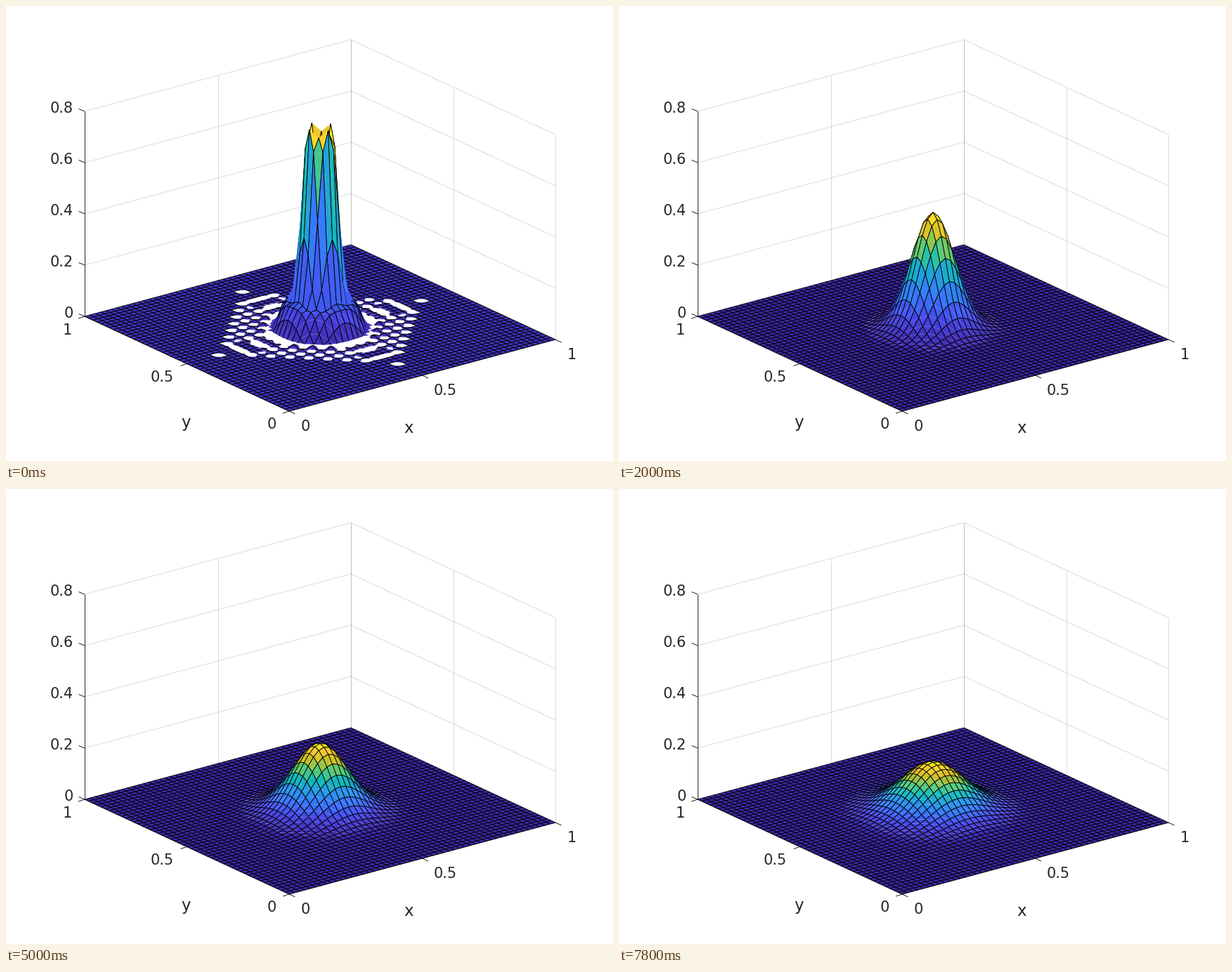
Animation of 864x648 px, one loop 8000 ms. Source, as a matplotlib script:

```python
import numpy as np
import matplotlib.pyplot as plt
from matplotlib.animation import FuncAnimation
from matplotlib.collections import LineCollection, PolyCollection
from matplotlib.colors import LinearSegmentedColormap

W, H = 864, 648
FRAMES, INTERVAL = 40, 200
N = 50
INK = "#262626"
CLEAR, BLACK = (0, 0, 0, 0), (0, 0, 0, 1)

# Screen position of the origin and of one unit along each axis
ORIGIN = np.array([403.0, 577.0])
AX_X = np.array([379.0, -102.0])
AX_Y = np.array([-291.0, -135.0])
AX_Z = np.array([0.0, -365.0])

CMAP = LinearSegmentedColormap.from_list("heat", [
    "#3e26a8", "#4747eb", "#3877fe", "#2697ea", "#12beb9",
    "#5ccc76", "#c8c129", "#feca33", "#f9fb15"])


def project(x, y, z=0.0):
    x, y, z = (np.asarray(v, float)[..., None] for v in (x, y, z))
    return ORIGIN + x * AX_X + y * AX_Y + z * AX_Z


# Grid coordinates, in cells from the centre
I, J = np.meshgrid(np.arange(N + 1) - N // 2, np.arange(N + 1) - N // 2,
                   indexing="ij")
R = np.hypot(I, J)
THETA = np.arctan2(J, I)


def ripple():
    """Grid ringing around the peak: rings on the axes, checks between."""
    amp = 0.19 * np.exp(-np.abs(R - 2) / 2.3)
    ring = np.cos(2 * np.pi * (R - 2) / 3.75)
    check = (np.cos(np.pi * I) + np.cos(np.pi * J)) / 2
    on_axis = np.cos(2 * THETA) ** 12
    far = on_axis * ring + (1 - on_axis) * check + 0.1
    mix = np.clip((R - 7) / 2, 0, 1)
    wave = amp * ((1 - mix) * ring + mix * far)
    wave -= 0.17 * np.exp(-(R - 0.6) ** 2 / 0.5)
    return np.where(np.abs(I) + np.abs(J) < 19.7, wave, 0)


RIPPLE = ripple()


def height(n):
    """A spreading Gaussian with ringing that dies away."""
    var = 0.0022 + 0.0002 * n
    z = 0.0119 / (2 * np.pi * var) * np.exp(-(R / N) ** 2 / (2 * var))
    z += RIPPLE * 0.4 ** n
    dip = np.exp(-(R - 8.1 - 0.37 * n) ** 2 / 0.55)
    z -= 0.03 * 0.66 ** n * dip * np.sqrt(np.maximum(np.cos(4 * THETA), 0))
    return np.where(z > -5e-5, np.maximum(z, 0), z)


def clip_triangle(pts, zs):
    """Part of a triangle above z = 0, and its two outer edges there."""
    poly, edges = [], []
    for k in range(3):
        m = (k + 1) % 3
        p, q, a, b = pts[k], pts[m], zs[k], zs[m]
        if a >= 0:
            poly.append(p)
        edge = [p, q]
        if (a < 0) != (b < 0):
            cut = p + (q - p) * a / (a - b)
            poly.append(cut)
            edge = [p, cut] if a >= 0 else [cut, q]
        if k < 2 and max(a, b) >= 0:
            edges.append(edge)
    return poly, edges


def corners(a):
    """The four corners of each cell, ordered from back to front."""
    quad = np.stack([a[:-1, :-1], a[1:, :-1], a[1:, 1:], a[:-1, 1:]], axis=2)
    quad = quad[::-1, ::-1]
    return quad.reshape(N * N, 4, *a.shape[2:])


def build(n):
    z = height(n)
    pts = corners(project(I / N + 0.5, J / N + 0.5, z))
    zs = corners(z)
    colors = CMAP((zs[:, 0] - z.min()) / (z.max() - z.min()))
    verts, faces, lines = [], [], []

    def add(path, face, line):
        verts.append(np.array(path))
        faces.append(face)
        lines.append(line)

    for p, h, c in zip(pts, zs, colors):
        if h.min() >= 0 and np.ptp(h) < 0.005:
            add(p[[0, 1, 2, 3, 0]], c, BLACK)
            continue
        # Open paths, so the shared diagonal is not stroked
        for tri in ([1, 2, 3], [3, 0, 1]):
            if h[tri].min() >= 0:
                add(p[tri], c, BLACK)
                continue
            poly, edges = clip_triangle(p[tri], h[tri])
            if len(poly) > 2:
                add(poly, c, CLEAR)
            for edge in edges:
                add(edge, CLEAR, BLACK)
    return verts, faces, lines


fig = plt.figure(figsize=(W / 100, H / 100), dpi=100, facecolor="white")
ax = fig.add_axes([0, 0, 1, 1])
ax.set_xlim(0, W)
ax.set_ylim(H, 0)
ax.axis("off")


def segment(a, b):
    return [project(*a), project(*b)]


def label(pos, text, size=15, ha="center"):
    ax.text(*pos, text, size=size, ha=ha, va="baseline", color=INK,
            family="DejaVu Sans")


# Back walls
levels = np.arange(1, 5) / 5
walls = [segment((0, 1, z), (1, 1, z)) for z in levels]
walls += [segment((1, 0, z), (1, 1, z)) for z in levels]
walls += [segment((x, 1, 0), (x, 1, .8)) for x in (.5, 1)]
walls += [segment((1, y, 0), (1, y, .8)) for y in (0, .5, 1)]
ax.add_collection(LineCollection(walls, colors=[(.15, .15, .15, .16)],
                                 linewidths=.72, zorder=1))

# Axis lines, ticks and labels
rules = [segment((0, 1, 0), (0, 1, .8)), segment((0, 0, 0), (1, 0, 0)),
         segment((0, 0, 0), (0, 1, 0))]


def tick(pos, step, offset, text, ha):
    p = project(*pos)
    rules.append([p, p + step])
    label(p + offset, text, ha=ha)


for v in (0, *levels):
    tick((0, 1, v), (-8.5, -3.5), (-16.5, 2), f"{v:.1g}", "right")
for v in (0, .5, 1):
    tick((v, 0, 0), (8.5, 4), (16.5, 28), f"{v:g}", "left")
    tick((0, v, 0), (-9, 3), (-18.5, 25.5), f"{v:g}", "right")
label((573, 607.5), "x", 16.5)
label((256, 600), "y", 16.5)
ax.add_collection(LineCollection(rules, colors=INK, linewidths=.72, zorder=2))

surface = PolyCollection([], linewidths=.62, joinstyle="round", zorder=3)
ax.add_collection(surface, autolim=False)


def update(n):
    verts, faces, lines = build(n)
    surface.set_verts(verts, closed=False)
    surface.set_facecolor(faces)
    surface.set_edgecolor(lines)
    return (surface,)


anim = FuncAnimation(fig, update, frames=FRAMES, interval=INTERVAL,
                     init_func=lambda: update(0), repeat=True, repeat_delay=0)
plt.show()
```
